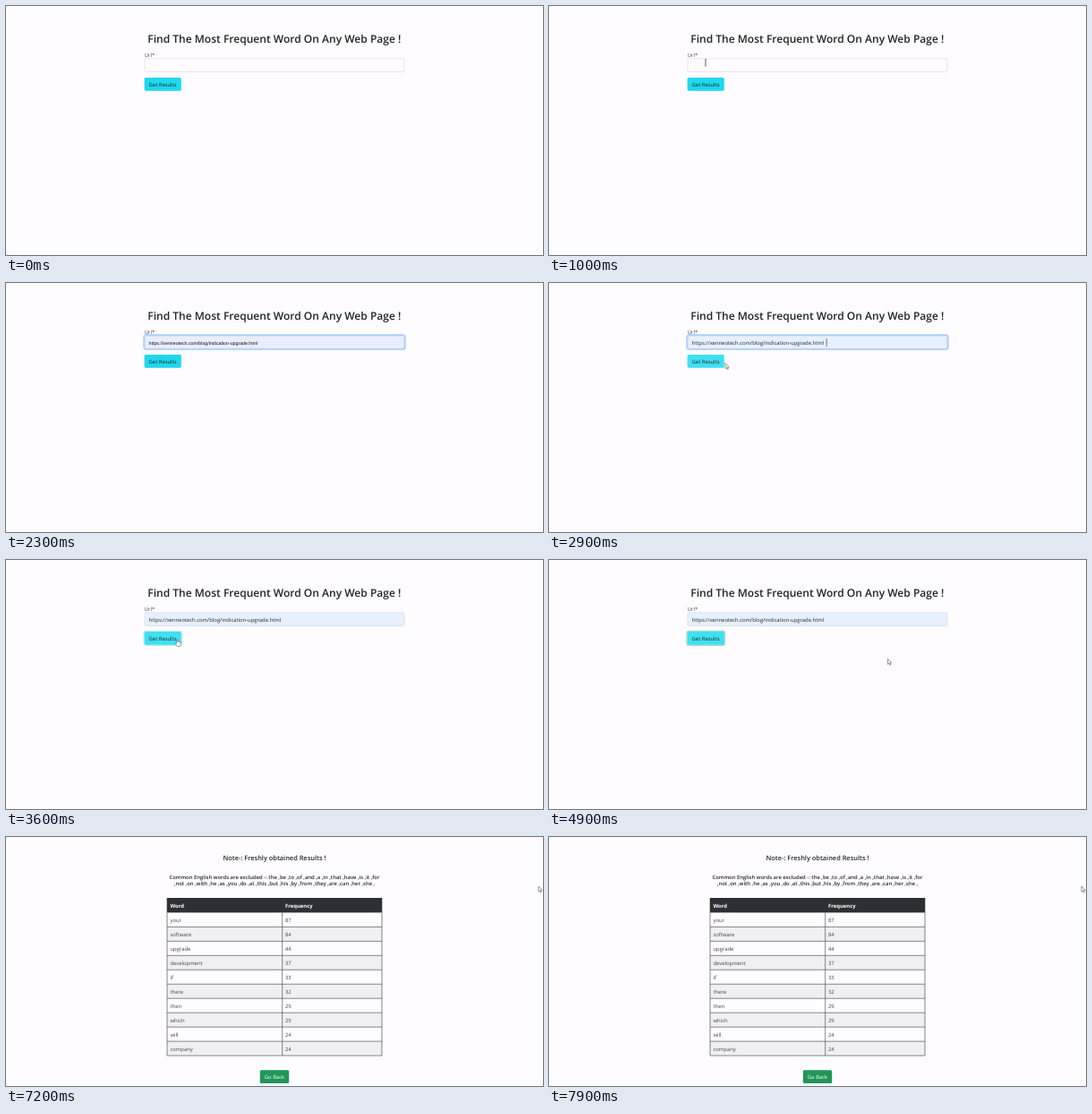
Recreate the animation shown at these times as an HTML page. Size 600 by 278 pixels, loop 8000 ms.

```html
<!DOCTYPE html>
<html lang="en">
<head>
<meta charset="utf-8">
<title>Word frequency</title>
<style>
  html, body { margin: 0; width: 100%; height: 100%; overflow: hidden; background: #fefcff; }
  svg { display: block; width: 100%; height: 100%; }
  text { font: 5.88px "Open Sans", "Noto Sans", sans-serif; fill: #24282c; white-space: pre; text-rendering: geometricPrecision; }
  .title { font-size: 12.04px; font-weight: 600; text-anchor: middle; fill: #212529; }
  .note { font-size: 7.4px; font-weight: 600; text-anchor: middle; }
  .common { font-size: 5.9px; font-weight: 600; text-anchor: middle; }
  .preview { font: 5.25px "Liberation Sans", Arial, sans-serif; fill: #111; }
  .head { font-weight: 700; fill: #fff; }
  .cell { fill: #44484c; }
  .light { fill: #fff; }
  .label { fill: #4a4e52; }
</style>
</head>
<body>
<svg viewBox="0 0 600 278" xmlns="http://www.w3.org/2000/svg">
  <rect width="600" height="278" fill="#fefcff"/>
  <g id="form">
    <text class="title" x="299.8" y="40.8">Find The Most Frequent Word On Any Web Page !</text>
    <text class="label" x="154.8" y="56.6">Url*</text>
    <rect id="fieldRing" x="154" y="58" width="292" height="16.2" rx="2.6" fill="none" stroke="#bcd6fd" stroke-width="1.8"/>
    <rect id="field" x="154.9" y="58.8" width="290.2" height="14.6" rx="1.8" stroke-width=".6"/>
    <text id="preview" class="preview" x="159.6" y="68.6">https://xenneotech.com/blog/indication-upgrade.html</text>
    <text id="url" x="159.6" y="68.5">https://xenneotech.com/blog/indication-upgrade.html</text>
    <path id="caret" d="M310.2 62V71" stroke="#222" stroke-width=".6"/>
    <rect id="buttonRing" x="154" y="79.3" width="42.4" height="16" rx="2.2" fill="none" stroke-width="1.3"/>
    <rect id="button" x="154.6" y="79.9" width="41.2" height="14.8" rx="1.6"/>
    <text x="159.6" y="89.5">Get Results</text>
  </g>
  <g id="results">
    <text class="note" x="300" y="26.3">Note-: Freshly obtained Results !</text>
    <text class="common" x="300" y="46.7">Common English words are excluded -: the ,be ,to ,of ,and ,a ,in ,that ,have ,is ,it ,for</text>
    <text class="common" x="300" y="54.2">,not ,on ,with ,he ,as ,you ,do ,at ,this ,but ,his ,by ,from ,they ,are ,can ,her ,she ,</text>
    <g id="table"></g>
    <rect x="283.8" y="260.2" width="32.4" height="14.8" rx="1.6" fill="#22965a"/>
    <text class="light" x="300" y="269.8" text-anchor="middle">Go Back</text>
  </g>
  <path id="arrow" d="M0 0V6.2L1.4 4.9L2.4 7L3.3 6.6L2.4 4.6H4.2Z" fill="#fff" stroke="#444" stroke-width=".55"/>
  <path id="hand" d="M0 .5Q.7-.4 1.2.5V3Q2.4 2.5 2.8 3.3Q4.6 3 4.8 4.2V6.2L4 8.4H.7L-1.5 5.2Q-1.5 4.1 0 5Z" fill="#fff" stroke="#444" stroke-width=".5"/>
  <path id="beam" d="M0-4.3V4.3" stroke="#333" stroke-width=".8"/>
</svg>
<script>
const LOOP = 8000, STEP = 100;
const $ = id => document.getElementById(id);
const set = (id, attrs) => { for (const k in attrs) $(id).setAttribute(k, attrs[k]); };
const show = (id, on) => set(id, { opacity: Number(on) });
const ramp = (t, a, b) => Math.min(1, Math.max(0, (t - a) / (b - a)));
const ease = p => p * p * (3 - 2 * p);
const within = (t, a, b) => t >= a && t < b;

const rows = [["your", 87], ["software", 84], ["upgrade", 44], ["development", 37], ["if", 33],
  ["there", 32], ["then", 29], ["which", 29], ["will", 24], ["company", 24]];

function buildTable() {
  const left = 180, width = 240, top = 84.4, h = 15.97, split = 308.7;
  const pair = (cls, y, a, b) =>
    `<text class="${cls}" x="183.5" y="${y}">${a}</text><text class="${cls}" x="312" y="${y}">${b}</text>`;
  const lines = rows.map((_, i) => `M${left} ${top + h * (i + 1)}h${width}`).join("");
  const columns = [left, split, left + width].map(x => `M${x} ${top}v${h * rows.length}`).join("");
  $("table").innerHTML =
    rows.map(([word, count], i) => {
      const y = top + i * h;
      return `<rect x="${left}" y="${y}" width="${width}" height="${h}" fill="${i % 2 ? "#f0eff1" : "#fefcff"}"/>` +
        pair("cell", y + 10.4, word, count);
    }).join("") +
    `<path d="${lines}${columns}" stroke="#45494d" stroke-width=".65"/>` +
    `<rect x="${left - .3}" y="68" width="${width + .6}" height="16.4" fill="#2c2f33"/>` +
    pair("head", 78.6, "Word", "Frequency");
}

// Pointer moves: start, end, from, to
const moves = [
  [400, 1100, [430, 8], [160, 66.5]],
  [2700, 3100, [208, 90], [186, 89]],
  [3200, 3300, [186, 89], [190.6, 88.3]],
  [4000, 4200, [190.6, 88.3], [378.6, 110.3]],
  [5300, 5900, [378.6, 110.3], [595, 55]]
];

function pointer(t) {
  let at = moves[0][2];
  for (const [a, b, from, to] of moves) {
    if (t < a) break;
    const p = ease(ramp(t, a, b));
    at = from.map((v, i) => v + (to[i] - v) * p);
  }
  return at;
}

function drawPointer(t) {
  const [x, y] = pointer(t);
  const visible = within(t, 500, 2200) || t >= 2800;
  const overText = x > 155 && x < 445 && y > 58 && y < 74;
  const overButton = x > 155 && x < 196 && y > 80 && y < 95;
  const kind = overText ? "beam" : overButton ? "hand" : "arrow";
  for (const id of ["arrow", "hand", "beam"]) {
    show(id, visible && id === kind);
    set(id, { transform: `translate(${x} ${y})` });
  }
}

function draw(t) {
  const done = t >= 7200;
  show("form", !done);
  show("results", done);

  const focus = ramp(t, 1300, 1600) * (1 - ramp(t, 3400, 3600));
  const filled = t >= 2700;
  show("fieldRing", focus);
  set("field", {
    fill: t >= 1900 ? (filled ? "#e7f0fd" : "#e9eefd") : "#fefcff",
    stroke: focus > .5 ? "#8fbcfb" : filled ? "#c9d6e4" : "#d6d6dc"
  });
  set("preview", { opacity: filled ? 0 : ramp(t, 1800, 2000) });
  show("url", filled);
  show("caret", within(t, 2700, 3300));

  const hover = t >= 2900;
  set("button", { fill: hover ? "#3fe0f0" : "#1fd8ec" });
  set("buttonRing", { opacity: ramp(t, 3400, 3700), stroke: t < 3800 ? "#a9e2ea" : "#a2d6cf" });
  drawPointer(t);
}

buildTable();
const start = performance.now();
function tick() {
  const t = (performance.now() - start) % LOOP;
  draw(Math.floor(t / STEP) * STEP);
  requestAnimationFrame(tick);
}
tick();
</script>
</body>
</html>
```
